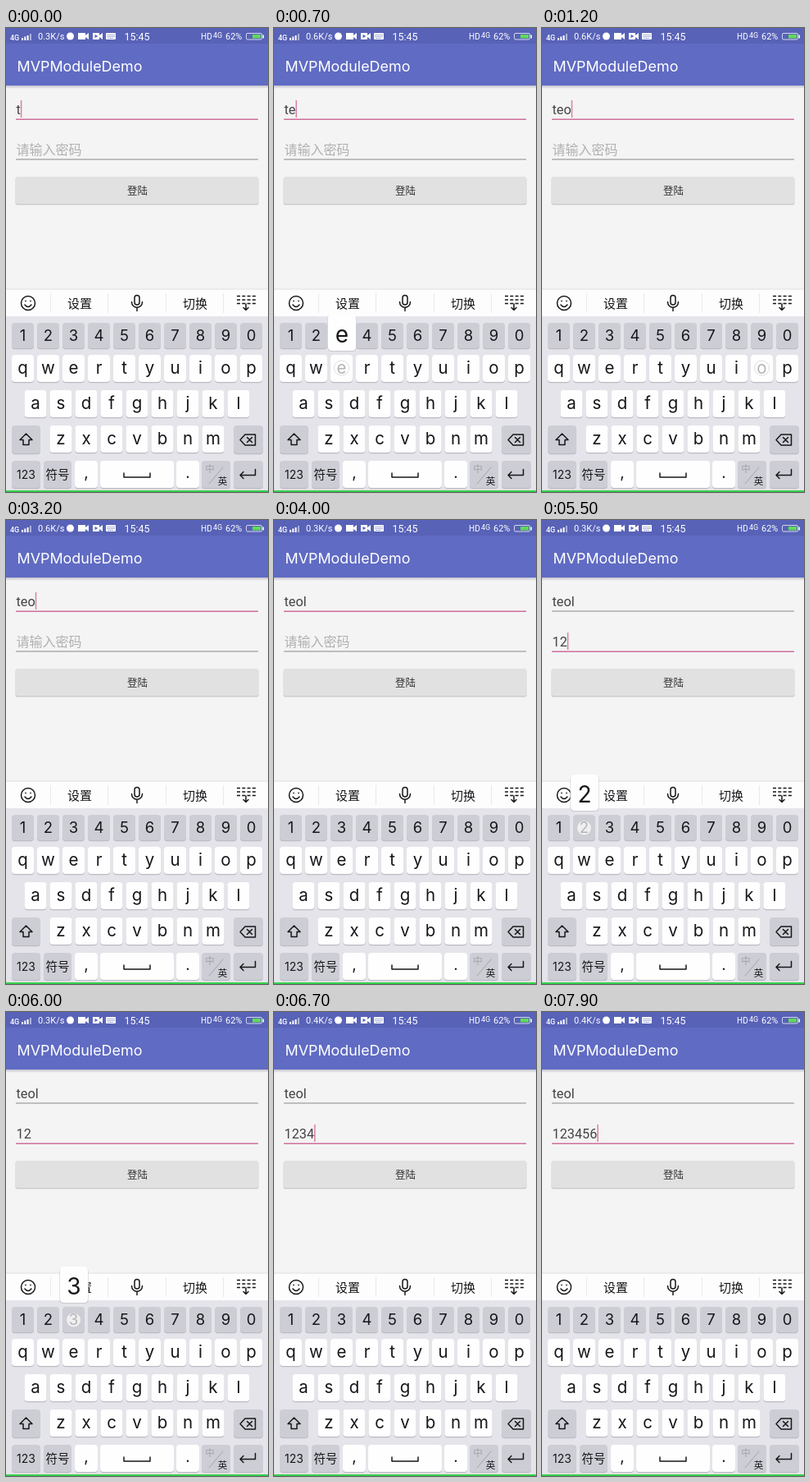
Recreate the animation shown at these times as an HTML page. Size 320 by 565 pixels, loop 8 s.

```html
<!DOCTYPE html>
<html lang="zh">
<head>
<meta charset="utf-8">
<title>MVPModuleDemo</title>
<style>
  html, body { margin: 0; width: 100%; height: 100%; overflow: hidden; background: #f4f4f4; }
  svg { display: block; width: 100vw; height: 100vh; }
  text { font-family: Inter, "Noto Sans CJK SC", sans-serif; fill: #17171a; }
  .mid { text-anchor: middle; }
  .status text { fill: #fff; font-family: Roboto, sans-serif; }
  .field { font: 16.3px Roboto, "Noto Sans CJK SC", sans-serif; fill: #444; }
  .hint { font-size: 16px; fill: #b0b0b3; }
  .line { fill: none; stroke: #17171a; stroke-width: 1.5; stroke-linecap: round; stroke-linejoin: round; }
</style>
</head>
<body>
<svg viewBox="0 0 320 565">
  <defs>
    <linearGradient id="shade" x2="0" y2="1">
      <stop stop-color="#c0c0ca"/><stop offset="1" stop-color="#f4f4f4"/>
    </linearGradient>
  </defs>
  <rect width="320" height="565" fill="#f4f4f4"/>
  <rect y="70" width="320" height="4" fill="url(#shade)"/>
  <rect width="320" height="70" fill="#606bc3"/>
  <rect width="320" height="19" fill="#5862b7"/>

  <g class="status" fill="#fff">
    <text x="5" y="15" font-size="9" font-weight="500">4G</text>
    <path d="M19 12h2v3h-2zM22.300 10.500h2v4.500h-2zM25.600 9h2v6h-2zM29.500 7h1v8h-1z"/>
    <text id="speed" x="39" y="14" font-size="11"></text>
    <circle cx="78.500" cy="10" r="4.500"/>
    <path d="M88 6h9v8h-9zM97 9l4-3v8l-4-3z"/>
    <path d="M106 6h8v8h-8zM114 9l4-3v8l-4-3z"/>
    <path d="M108.500 8l4 2-4 2z" fill="#5862b7"/>
    <rect x="122" y="6" width="12" height="8" rx="1"/>
    <path d="M123.500 8.500h9M123.500 10.500h9M125 12.500h6" stroke="#5862b7" stroke-dasharray="1 1"/>
    <text x="160" y="14.500" class="mid" font-size="12.500">15:45</text>
    <text x="238" y="14" font-size="10">HD</text>
    <text x="253" y="11.500" font-size="9">4G</text>
    <text x="268" y="14" font-size="11">62%</text>
    <rect x="293.500" y="6.500" width="19" height="7.500" rx="1.500" fill="none" stroke="#d5d8ee"/>
    <rect x="301" y="8" width="10" height="4.500" fill="#61d957"/>
    <rect x="313.500" y="8.500" width="1.500" height="4"/>
  </g>
  <text x="13.500" y="53" font-size="17.900" style="fill:#fff">MVPModuleDemo</text>

  <text id="user" class="field" x="12.500" y="105"></text>
  <text id="pass" class="field" x="12.500" y="153.500"></text>
  <rect id="userLine" x="12" y="110.500" width="296"/>
  <rect id="passLine" x="12" y="159.500" width="296"/>
  <rect id="caret" width="1.500" height="21" fill="#d97fa8"/>

  <rect x="11.500" y="182" width="297" height="33.500" rx="2" fill="#cdcdcd"/>
  <rect x="12" y="181" width="296" height="33" rx="2" fill="#e1e1e1"/>
  <text x="160.500" y="202.500" class="mid" font-size="12.500" style="fill:#333">登陆</text>

  <rect y="318" width="320" height="33" fill="#fdfdfe"/>
  <path d="M0 318h320" stroke="#dfdfe4"/>
  <path d="M54.500 323v24M124.500 323v24M195.500 323v24M265.500 323v24" stroke="#e9e9ee"/>
  <g class="line">
    <circle cx="27" cy="335" r="8.500"/>
    <path d="M23 337q4 5 8 0M24 332.300v.4M30 332.300v.4"/>
    <rect x="157" y="325.500" width="6" height="11.500" rx="3"/>
    <path d="M153.500 333.500c0 9 13 9 13 0M160 340.500v4"/>
    <path d="M282 326.500h23M282 331h23M282 335.500h23" stroke-dasharray="4 2.300" stroke-linecap="butt"/>
    <path d="M293 336v7M290 340.500l3 3 3-3"/>
  </g>
  <text x="90" y="340.500" class="mid" font-size="15">设置</text>
  <text x="231" y="340.500" class="mid" font-size="15">切换</text>

  <rect y="351" width="320" height="212" fill="#e4e4ea"/>
  <g id="keys"></g>
  <g class="line">
    <path d="M24.500 494l7.500 7.500h-4v6h-7v-6h-4z"/>
    <path d="M286 501.500l6-6.500h12.500v13H292zM294.500 498.500l6 6M300.500 498.500l-6 6"/>
    <path d="M144 542v5h32v-5"/>
    <path d="M304.500 537.500v7H286M290 540.500l-4 4 4 4"/>
    <path d="M248 555l17-20" stroke="#a2a2aa" stroke-width="1"/>
  </g>
  <text x="24.500" y="548.500" class="mid" font-size="14">123</text>
  <text x="63" y="549" class="mid" font-size="14.500">符号</text>
  <text x="98" y="548" class="mid" font-size="19">,</text>
  <text x="222" y="548" class="mid" font-size="19">.</text>
  <text x="249" y="541" class="mid" font-size="11.500" style="fill:#a2a2aa">中</text>
  <text x="264.500" y="556" class="mid" font-size="11.500">英</text>
  <rect y="563" width="320" height="2" fill="#35d04a"/>

  <circle id="touch" r="9" fill="#fff" fill-opacity=".68" stroke="#b9b9bd" stroke-opacity=".45"/>
  <g id="popup">
    <rect x="-17.500" y="1" width="35" height="44" rx="4.500" fill="#c9c9d0"/>
    <rect x="-17" width="34" height="44" rx="4.500" fill="#fefefe"/>
    <text id="popupText" class="mid" y="34" font-size="28"></text>
  </g>
</svg>
<script>
const $ = id => document.getElementById(id);
const LOOP = 8000, USER = 'teol', PASS = '123456', FOCUS = 4150;
const GREY = '#cdced5', WHITE = '#fefefe';
const taps = [-300, 700, 1050, 3500, 5080, 5450, 6050, 6420, 7050, 7500]
  .map((at, i) => ({ at, key: (USER + PASS)[i] }));
const spots = {};

function addKey(x, y, w, h, fill, label = '', size = 20) {
  const rect = (dy, color) =>
    `<rect x="${x}" y="${y + dy}" width="${w}" height="${h}" rx="4" fill="${color}"/>`;
  const mid = x + w / 2;
  $('keys').innerHTML += rect(1.2, '#bbbbc4') + rect(0, fill) +
    `<text class="mid" x="${mid}" y="${y + h / 2 + 6}" font-size="${size}">${label}</text>`;
  if (label) spots[label] = { x: mid, y };
}

[['1234567890', 20.5, 359], ['qwertyuiop', 20.5, 398],
 ['asdfghjkl', 36, 441], ['zxcvbnm', 67, 484]].forEach(([row, x, y], n) =>
  [...row].forEach((c, i) =>
    addKey(x - 13.5 + i * 31, y, 27, n ? 33 : 31, n ? WHITE : GREY, c, n ? 20.5 : 18.5)));

addKey(7, 484, 35, 34, GREY);
addKey(278, 484, 36, 34, GREY);
[[7, 35, GREY], [46, 34, GREY], [84, 28, WHITE], [115, 90, WHITE],
 [208, 28, WHITE], [239, 35, GREY], [278, 36, GREY]]
  .forEach(([x, w, fill]) => addKey(x, 527, w, 33, fill));

const show = (el, on) => el.setAttribute('visibility', on ? 'visible' : 'hidden');

function place(el, x, y) { el.setAttribute('transform', `translate(${x} ${y})`); }

function underline(el, active) {
  el.setAttribute('height', active ? 1.5 : 1);
  el.setAttribute('fill', active ? '#d06f9c' : '#8a8a8e');
}

function draw(t) {
  const count = taps.filter(p => p.at <= t).length;
  const inPass = t >= FOCUS;
  const pass = PASS.slice(0, Math.max(0, count - USER.length));
  $('speed').textContent = (t < 500 ? '0.3' : t < 3500 ? '0.6' : t < 6500 ? '0.3' : '0.4') + 'K/s';
  $('user').textContent = USER.slice(0, count);
  $('pass').textContent = pass || '请输入密码';
  $('pass').classList.toggle('hint', !pass);
  underline($('userLine'), !inPass);
  underline($('passLine'), inPass);

  // The caret restarts its blink at each edit or focus change.
  const last = taps[count - 1].at;
  const since = t - (inPass ? Math.max(last, FOCUS) : last);
  const width = inPass ? (pass ? $('pass').getComputedTextLength() : 0)
                       : $('user').getComputedTextLength();
  $('caret').setAttribute('x', 12.5 + width);
  $('caret').setAttribute('y', inPass ? 137 : 88);
  show($('caret'), since % 1000 < 500);

  const tap = taps.find(p => t >= p.at - 100 && t < p.at + 250);
  const onField = t >= FOCUS - 100 && t < FOCUS + 50;
  show($('touch'), tap || onField);
  show($('popup'), tap && t < tap.at + 100);
  if (tap) {
    const { x, y } = spots[tap.key];
    place($('touch'), x, y + 16);
    place($('popup'), x + 0.5, y - 49);
    $('popupText').textContent = tap.key;
  } else if (onField) place($('touch'), 150, 148);
}

const start = performance.now();
function tick() {
  draw((performance.now() - start) % LOOP);
  requestAnimationFrame(tick);
}
tick();
</script>
</body>
</html>
```
